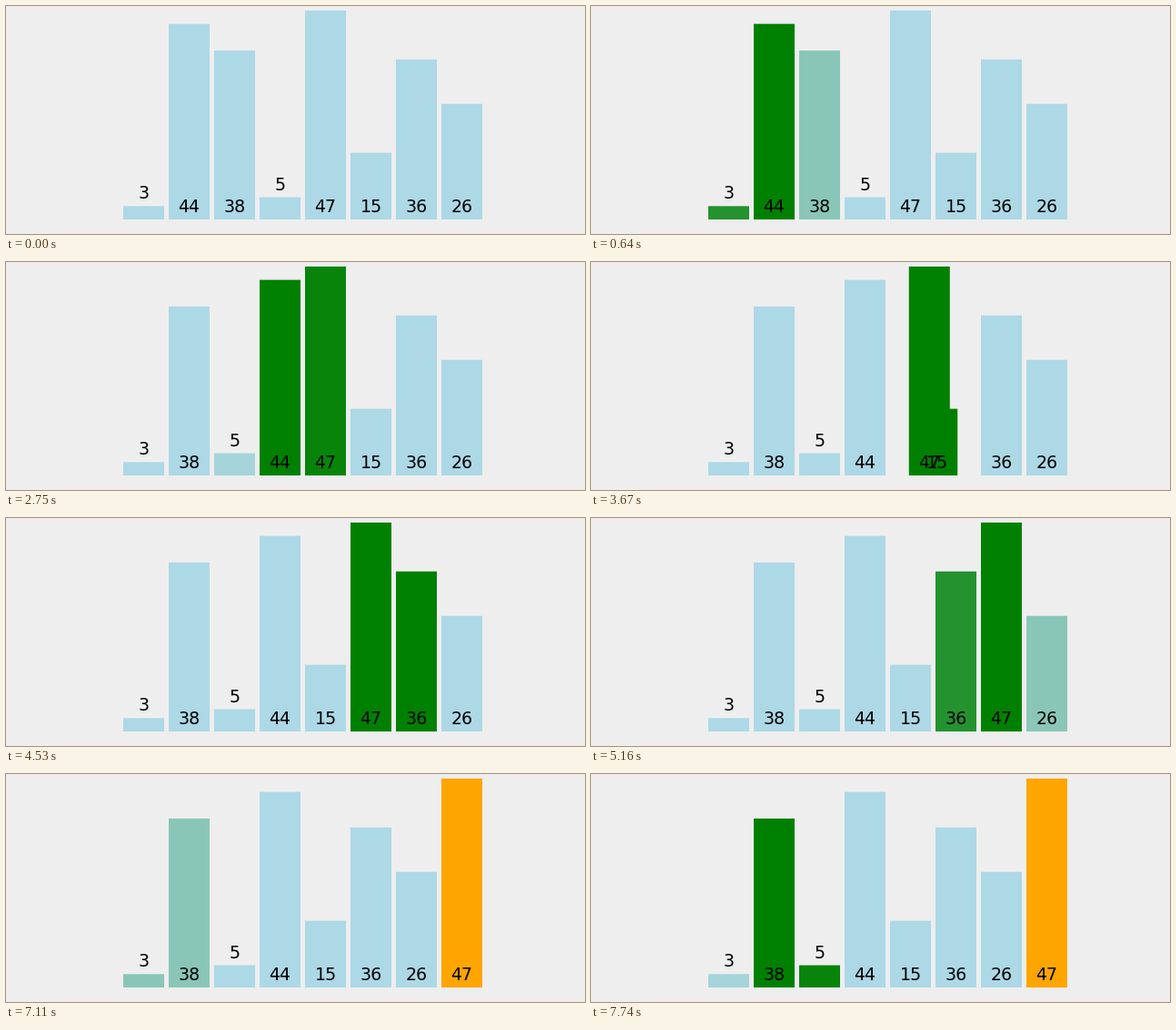
These frames come from a looping animation (637 by 251 pixels, 8 s). A matplotlib script:

```python
import matplotlib.pyplot as plt
from matplotlib.animation import FuncAnimation
from matplotlib.colors import to_rgb
from matplotlib.patches import Rectangle

W, H, DPI = 637, 251, 64
LOOP, TICK = 8000, 20
LEFT, PITCH, BAR_W, BASE, TALLEST = 129, 50, 45, 235, 230
FONT_PX = 19

VALUES = [3, 44, 38, 5, 47, 15, 36, 26]
SCALE = TALLEST / max(VALUES)
IDLE, ACTIVE, DONE = to_rgb("lightblue"), to_rgb("green"), to_rgb("orange")

# Time in ms from the start of one action to the next.
START, COMPARE, KEEP, SWAP, SETTLE = 100, 460, 540, 557, 925


def bubble_sort():
    """List (time, kind, what) for each comparison, swap and settled bar."""
    values, t, events = VALUES[:], START, []
    for last in range(len(values) - 1, 0, -1):
        for j in range(last):
            colours = {j: ACTIVE, j + 1: ACTIVE}
            if j:
                colours[j - 1] = IDLE
            events.append((t, "fade", colours))
            if values[j] > values[j + 1]:
                values[j], values[j + 1] = values[j + 1], values[j]
                t += COMPARE
                events.append((t, "swap", j))
                t += SWAP
            else:
                # The first pair of a pass is held a little longer.
                t += COMPARE if j else KEEP
        events.append((t, "fade", {last - 1: IDLE, last: DONE}))
        t += SETTLE
    return [e for e in events if e[0] < LOOP]


EVENTS = bubble_sort()


def progress(elapsed, first, gain, step):
    """Cubic in-out easing, advancing in jumps of one step."""
    u = min(1, first + gain * (elapsed // step))
    return 4 * u**3 if u < 0.5 else 1 - 4 * (1 - u)**3


def mix(a, b, u):
    return tuple(p + (q - p) * u for p, q in zip(a, b))


def state(t):
    """Slot position and colour of every bar at time t."""
    order = list(range(len(VALUES)))
    pos = [float(i) for i in order]
    cols = [IDLE] * len(VALUES)
    for start, kind, what in EVENTS:
        if t < start:
            break
        if kind == "fade":
            e = progress(t - start, 0.37, 0.4, 70)
            for slot, col in what.items():
                bar = order[slot]
                cols[bar] = mix(cols[bar], col, e)
        else:
            e = progress(t - start, 0.2, 0.27, 75)
            a, b = order[what], order[what + 1]
            pos[a], pos[b] = what + e, what + 1 - e
            order[what], order[what + 1] = b, a
    return pos, cols


fig = plt.figure(figsize=(W / DPI, H / DPI), dpi=DPI, facecolor="#eeeeee")
ax = fig.add_axes([0, 0, 1, 1])
ax.set_xlim(0, W)
ax.set_ylim(H, 0)
ax.axis("off")

bars, labels = [], []
for i, v in enumerate(VALUES):
    height = v * SCALE
    top = BASE - height
    bar = Rectangle((LEFT + PITCH * i, top), BAR_W, height,
                    facecolor=IDLE, linewidth=0, snap=False, zorder=1 + i)
    bars.append(ax.add_patch(bar))
    # Short bars carry their number above the top edge.
    foot = round(top if height < 30 else BASE) - 8
    labels.append(ax.text(0, foot, str(v), ha="center", va="baseline",
                          family="DejaVu Sans", color="black",
                          fontsize=FONT_PX * 72 / DPI, zorder=20 + i))


def draw(frame):
    pos, cols = state(frame * TICK + TICK / 2)
    for bar, label, p, col in zip(bars, labels, pos, cols):
        x = LEFT + PITCH * p
        bar.set_x(x)
        bar.set_facecolor(col)
        label.set_x(x + BAR_W / 2)
    return bars + labels


anim = FuncAnimation(fig, draw, frames=LOOP // TICK, interval=TICK,
                     repeat=True, repeat_delay=0, blit=False)
plt.show()
```
